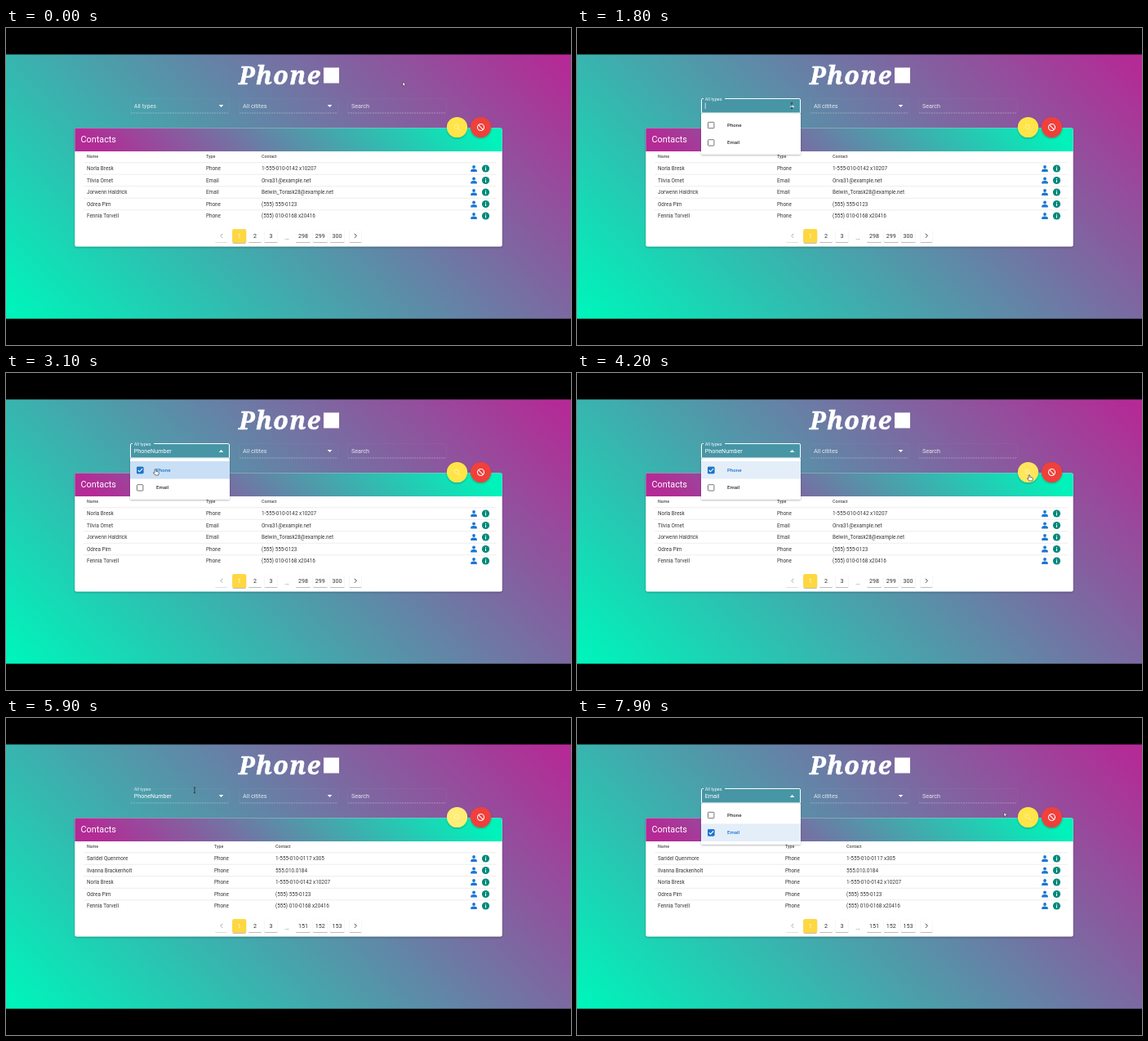
Recreate the animation shown at these times as an HTML page. Size 692 by 388 pixels, loop 8000 ms.

```html
<!DOCTYPE html>
<html lang="en">
<head>
<meta charset="utf-8">
<title>Phone contacts</title>
<style>
  html, body { margin: 0; width: 100%; height: 100%; overflow: hidden; background: #000; }
  svg { display: block; width: 692px; height: 388px; font-family: Roboto, Inter, sans-serif; }
</style>
</head>
<body>
<svg id="stage" viewBox="0 0 692 388" xmlns="http://www.w3.org/2000/svg">
  <defs>
    <linearGradient id="sky" gradientUnits="userSpaceOnUse" x1="92" y1="448" x2="600" y2="-60">
      <stop offset=".02" stop-color="#00f3ba"/><stop offset=".98" stop-color="#b42a96"/>
    </linearGradient>
    <linearGradient id="bar" gradientUnits="userSpaceOnUse" x1="208" y1="275" x2="484" y2="-1">
      <stop offset=".05" stop-color="#b42a96"/><stop offset=".95" stop-color="#00f3ba"/>
    </linearGradient>
    <filter id="shadow" x="-20%" y="-20%" width="140%" height="150%">
      <feDropShadow dx="0" dy="1" stdDeviation="1.1" flood-opacity=".3"/>
    </filter>
    <filter id="lift" x="-20%" y="-20%" width="140%" height="150%">
      <feDropShadow dx="0" dy=".8" stdDeviation=".5" flood-opacity=".32"/>
    </filter>
  </defs>
</svg>
<script>
const LOOP = 8000;
const stage = document.getElementById('stage');

const text = (x, y, s, size, fill, extra = '') =>
  `<text x="${x}" y="${y}" font-size="${size}" fill="${fill}" ${extra}>${s}</text>`;
const rect = (x, y, w, h, fill, extra = '') =>
  `<rect x="${x}" y="${y}" width="${w}" height="${h}" fill="${fill}" ${extra}/>`;
const path = (d, fill, extra = '') => `<path d="${d}" fill="${fill}" ${extra}/>`;
const group = (id, body, extra = '') => `<g id="${id}" ${extra}>${body}</g>`;
const line = (d, color, width, extra = '') =>
  path(d, 'none', `stroke="${color}" stroke-width="${width}" ${extra}`);

function field(x, label) {
  return rect(x + .5, 86.5, 121, 17.5, 'none', 'rx="1.5" stroke="#fff" stroke-opacity=".05" stroke-width=".7"')
    + line(`M${x + 1} 104H${x + 121}`, 'rgba(255,255,255,.38)', .7, 'stroke-dasharray="2 1"')
    + (label ? text(x + 5, 98, label, 7.2, '#fff', 'opacity=".82"') : '');
}

const arrowDown = x => path(`M${x - 2.8} 94h5.6l-2.8 2.9z`, '#fff');

function rowIcons(y) {
  return `<circle cx="573" cy="${y - 2}" r="1.9" fill="#1976d2"/>`
    + path(`M569.2 ${y + 4}v-1.2q0-2.4 3.8-2.4t3.8 2.4v1.2z`, '#1976d2')
    + `<circle cx="587.5" cy="${y}" r="4.6" fill="#00897b"/>`
    + rect(587, y - 2.5, 1, 1, '#fff') + rect(587, y - .8, 1, 3.3, '#fff');
}

function table(id, typeX, contactX, rows, pages) {
  const head = [[99, 'Name'], [typeX, 'Type'], [contactX, 'Contact']]
    .map(([x, s]) => text(x, 159, s, 5.3, '#555', 'font-weight="500"')).join('');
  const body = rows.map(([name, type, contact], i) => {
    const y = 172 + i * 14.5;
    return text(99, y + 2.2, name, 6.35, '#383838') + text(typeX, y + 2.2, type, 6.35, '#383838')
      + text(contactX, y + 2.2, contact, 6.35, '#383838');
  }).join('');
  const last = pages.map((p, i) => pageButton(364 + i * 20.8, p, 18)).join('');
  return group(id, head + body + last);
}

function pageButton(x, label, w = 16) {
  return rect(x - w / 2, 246.5, w, 15.5, '#fff', 'rx="1.5" filter="url(#lift)"')
    + text(x, 256.8, label, 7.1, '#333', 'text-anchor="middle"');
}

function menuItem(id, y, label) {
  return rect(152, y - 10.8, 122, 21.6, '#e4eef9', `id="${id}Row"`)
    + rect(160.5, y - 3.5, 7.4, 7.4, '#fff', 'rx=".8" stroke="#666" stroke-width=".9"')
    + group(id + 'Tick', rect(160, y - 4, 8.4, 8.4, '#1976d2', 'rx="1"')
      + line(`M161.7 ${y + .2}l1.8 1.8 3.6-3.7`, '#fff', 1.1))
    + text(184, y + 2, label, 6.1, '#333', `id="${id}Text" font-weight="500"`);
}

const firstRows = [
  ['Norla Bresk', 'Phone', '1-555-010-0142 x10207'],
  ['Tilvia Ornet', 'Email', 'Orva31@example.net'],
  ['Jorwenn Haldrick', 'Email', 'Belwin_Torask28@example.net'],
  ['Odrea Pim', 'Phone', '(555) 555-0123'],
  ['Fennia Torvell', 'Phone', '(555) 010-0168 x20416'],
];
const phoneRows = [
  ['Saridel Quenmore', 'Phone', '1-555-010-0117 x305'],
  ['Ilvanna Brackenholt', 'Phone', '555.010.0184'],
  firstRows[0], firstRows[3], firstRows[4],
];

const rows = [0, 1, 2, 3, 4].map(i => 172 + i * 14.5);

stage.innerHTML += [
  rect(0, 32.4, 692, 323.4, 'url(#sky)'),
  text(285, 69.3, 'Phone', 30, '#fff',
    'font-family="Noto Serif, serif" font-weight="700" font-style="italic" letter-spacing="1.4" stroke="#fff" stroke-width=".6"'),
  rect(389, 48.5, 19, 19, '#fff'),
  field(152, ''), field(285, 'All citites'), field(418, 'Search'), arrowDown(396.5),

  // contacts card
  rect(84.3, 122.4, 523.4, 145.2, '#fff', 'rx="2" filter="url(#shadow)"'),
  path('M84.3 151V124.4q0-2 2-2H605.7q2 0 2 2V151z', 'url(#bar)'),
  text(91.6, 140.1, 'Contacts', 10.8, '#fff'),
  rows.map(y => line(`M95 ${y - 7.2}H601`, '#e6e6e6', .7)).join(''),
  rows.map(rowIcons).join(''),
  rect(256, 246.5, 15, 15.5, '#fff', 'rx="1.5" filter="url(#lift)" opacity=".5"'),
  line('M265.2 251.8l-2.4 2.5 2.4 2.5', '#aaa', 1),
  rect(277.2, 246, 17, 17, '#ffd740', 'rx="2" filter="url(#lift)"'),
  text(285.7, 257, '1', 7.1, '#fff', 'text-anchor="middle"'),
  pageButton(305, 2), pageButton(324.5, 3), text(341.3, 259, '...', 7, '#444'),
  rect(420.5, 246.5, 15, 15.5, '#fff', 'rx="1.5" filter="url(#lift)"'),
  line('M426.9 251.8l2.4 2.5-2.4 2.5', '#444', 1),
  table('tableAll', 245, 313, firstRows, [298, 299, 300]),
  table('tablePhone', 255, 330, phoneRows, [151, 152, 153]),

  // round buttons
  '<circle id="find" cx="552.5" cy="121.5" r="12.6" filter="url(#shadow)"/>',
  group('lens', '<circle cx="551.7" cy="120.7" r="2.6"/><path d="M553.7 122.7l2.8 2.8"/>',
    'fill="none" stroke="#fff" stroke-width="1" opacity=".45"'),
  '<circle cx="581.5" cy="121.5" r="12.6" fill="#f0403a" filter="url(#shadow)"/>',
  '<circle cx="581.5" cy="121.5" r="4" fill="none" stroke="#fff" stroke-width="1.1"/>',
  line('M578.7 118.7l5.6 5.6', '#fff', 1.1),

  // type filter
  group('focus', rect(152, 86, 122, 18, '#4796a5', 'rx="1.5"')
    + line('M155 86.5H153.5Q152.5 86.5 152.5 88V104H273.5V88Q273.5 86.5 272 86.5H181', '#fff', 1)),
  text(156.7, 98, 'All types', 7.2, '#fff', 'id="label"'),
  text(156.7, 98.2, '', 7.2, '#fff', 'id="value"'),
  rect(156.8, 91.5, .7, 7.5, '#fff', 'id="caret"'),
  group('arrowOff', arrowDown(263.5)),
  group('arrowOn', path('M260.7 97h5.6l-2.8-2.9z', '#fff')),
  group('menu', rect(152, 104.2, 122, 50.6, '#fff', 'rx="1.5" filter="url(#shadow)"')
    + menuItem('phone', 118.8, 'Phone') + menuItem('email', 140.2, 'Email')),

  group('pointer',
    group('arrow', path('M0 0v5l1.2-1 .9 1.9 1-.5-.9-1.8h1.5z', '#fff', 'stroke="#222" stroke-width=".5"'))
    + group('hand', path('M-.9 0Q0-1 .8 0V2.4l3 .8Q4.6 3.5 4.3 4.6L3.6 7H0L-2.6 4.2Q-2.3 3.2-.9 4.1z',
      '#fff', 'stroke="#222" stroke-width=".6"'))
    + group('beam', line('M-1.2-3.3H1.2M0-3.3V3.3M-1.2 3.3H1.2', '#222', .7))),
].join('');

const el = {};
stage.querySelectorAll('[id]').forEach(node => { el[node.id] = node; });
const show = (id, on) => el[id].setAttribute('display', on ? 'inline' : 'none');
const set = (id, name, v) => el[id].setAttribute(name, v);

// time, x, y of the pointer
const moves = [
  [0, 486, 66], [100, 486, 66], [650, 270.5, 66], [850, 270.5, 66], [1250, 263, 95], [2000, 263, 95],
  [2500, 183, 118], [3400, 183, 118], [4100, 554, 125], [4900, 554, 125], [5800, 231, 88],
  [6150, 231, 90], [6650, 184, 139], [7350, 184, 139], [7900, 523, 115.5], [8000, 548, 120],
];

function pointerAt(t) {
  const i = Math.max(1, moves.findIndex(m => m[0] > t));
  const [a, b] = [moves[i - 1], moves[i]];
  const k = (t - a[0]) / (b[0] - a[0]);
  const e = k * k * (3 - 2 * k);
  return [a[1] + (b[1] - a[1]) * e, a[2] + (b[2] - a[2]) * e];
}

function render(t) {
  const open = (t >= 1350 && t < 4500) || t >= 6150;
  const choice = t < 2700 ? '' : t < 6950 ? 'phone' : 'email';
  const [x, y] = pointerAt(t);
  const inField = x > 152 && x < 274 && y > 86 && y < 104;
  const inMenu = open && x > 152 && x < 274 && y >= 104 && y < 155;
  const onFind = Math.hypot(x - 552.5, y - 121.5) < 12.6;
  const hover = inMenu ? (y < 130 ? 'phone' : 'email') : '';

  show('tableAll', t < 4900);
  show('tablePhone', t >= 4900);
  show('focus', open);
  show('menu', open);
  show('arrowOn', open);
  show('arrowOff', !open);
  show('caret', open && !choice && (t - 1350) % 1000 < 500);

  const raise = choice ? 1 : Math.min(1, Math.max(0, (t - 1350) / 200));
  set('label', 'font-size', 7.2 - 1.7 * raise);
  set('label', 'y', 98 - 9.4 * raise);
  set('label', 'fill-opacity', open ? 1 : .85);
  el.value.textContent = { phone: 'PhoneNumber', email: 'Email' }[choice] || '';

  for (const id of ['phone', 'email']) {
    const picked = id === choice;
    show(id + 'Tick', picked);
    show(id + 'Row', picked || id === hover);
    set(id + 'Row', 'fill', !picked ? '#eeeeee' : id === hover ? '#c9dff5' : '#e4eef9');
    set(id + 'Text', 'fill', picked ? '#1976d2' : '#333');
  }

  set('find', 'fill', t >= 4500 && t < 6150 ? '#ffee74' : onFind ? '#ffe65c' : '#ffe54a');
  set('pointer', 'transform', `translate(${x.toFixed(2)} ${y.toFixed(2)})`);
  const hand = inMenu || onFind;
  show('hand', hand);
  show('beam', inField && !hand);
  show('arrow', !hand && !inField);
}

const start = performance.now();
function tick() {
  render((performance.now() - start) % LOOP);
  requestAnimationFrame(tick);
}
tick();
</script>
</body>
</html>
```
